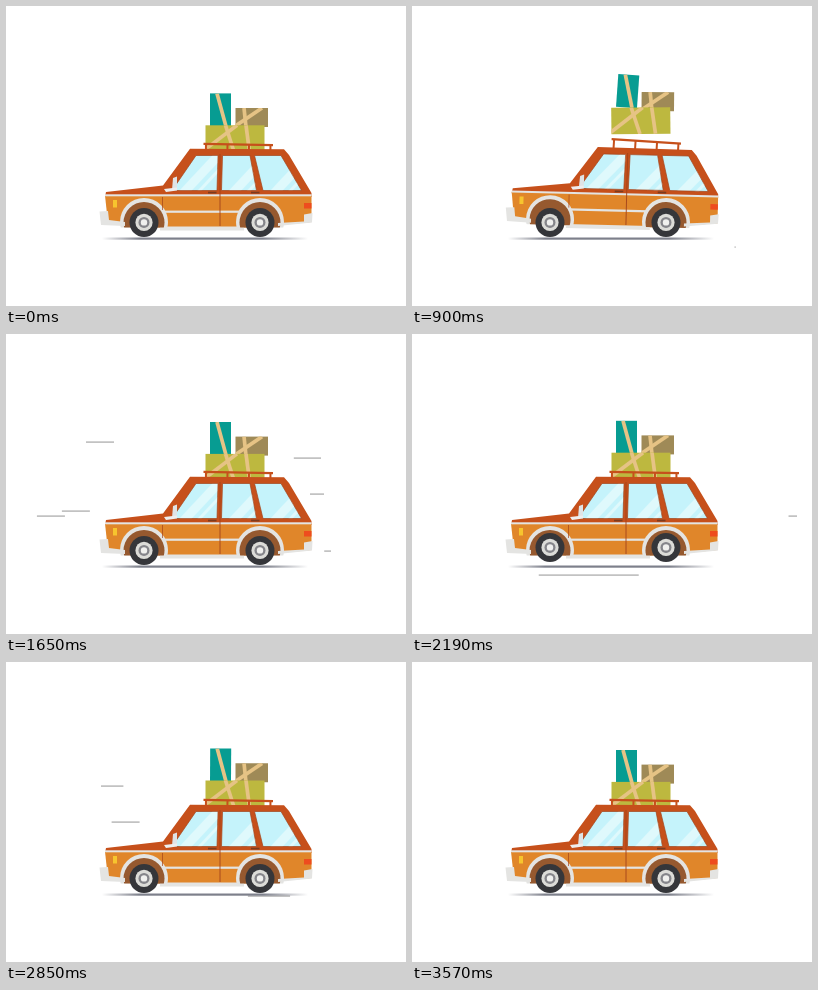
An HTML page with a canvas for the animation above (3.6 s loop, 400x300 px).

```html
<!DOCTYPE html>
<html lang="en">
<head>
<meta charset="utf-8">
<title>Road trip</title>
<style>
  html, body { margin: 0; width: 100%; height: 100%; overflow: hidden; background: #fff; }
  canvas { display: block; width: 400px; height: 300px; }
</style>
</head>
<body>
<canvas id="stage" width="400" height="300"></canvas>
<script>
const ctx = document.getElementById('stage').getContext('2d');
const LOOP = 3600, FRAME = 30;

const dark = '#c6501b', seam = '#a3441b', orange = '#e0862a', brown = '#96592f';
const pale = '#e4e4e2', glass = '#c5f3fb', tan = '#e6c385';

const clamp = (v, a, b) => Math.max(a, Math.min(b, v));

// Parabolic hop from start to start + dur, reaching 1 halfway
const hop = (t, start, dur) => Math.max(0, 1 - (2 * (t - start) / dur - 1) ** 2);

// A hop followed by a small rebound
const bounce = (t, start, dur) => hop(t, start, dur) + 0.15 * hop(t, start + dur, dur * 0.4);

function path(points) {
  ctx.beginPath();
  for (let i = 0; i < points.length; i += 2) ctx.lineTo(points[i], points[i + 1]);
}

function poly(color, ...points) {
  path(points);
  ctx.fillStyle = color;
  ctx.fill();
}

function line(color, width, ...points) {
  path(points);
  ctx.strokeStyle = color;
  ctx.lineWidth = width;
  ctx.stroke();
}

function rect(color, x, y, w, h) {
  ctx.fillStyle = color;
  ctx.fillRect(x, y, w, h);
}

function disc(color, x, y, r) {
  ctx.beginPath();
  ctx.arc(x, y, r, 0, Math.PI * 2);
  ctx.fillStyle = color;
  ctx.fill();
}

function turned(x, y, degrees, draw) {
  ctx.save();
  ctx.translate(x, y);
  ctx.rotate(degrees * Math.PI / 180);
  ctx.translate(-x, -y);
  draw();
  ctx.restore();
}

// Each lane has a height, a reach to both sides of the car and a first start.
const CENTER = 205, REPEAT = 1510, LAST_START = 3080, QUIET = 3270;
const lanes = [
  { y: 108, reach: 145, start: 65 },
  { y: 124, reach: 110, start: 1305 },
  { y: 160, reach: 113, start: 1275 },
  { y: 177, reach: 180, start: 48 },
  { y: 182, reach: 180, start: 87 },
  { y: 198, reach: 113, start: 685 },
  { y: 217, reach: 120, start: 1242 },
  { y: 234, reach: 156, start: 999 },
  { y: 241, reach: 118, start: 523 }
];

function drawStreaks(t) {
  if (t >= QUIET) return;
  for (const { y, reach, start } of lanes) {
    // Streaks get longer and faster close to the ground
    const ground = ((y - 108) / 133) ** 30;
    const length = 28 + 72 * ground, speed = 0.64 + 0.25 * ground;
    const from = CENTER - reach, to = CENTER + reach;
    for (let s = start; s < Math.min(t, LAST_START); s += REPEAT) {
      const head = from + speed * (t - s), tail = head - length;
      if (tail >= to) continue;
      const a = Math.max(tail, from);
      rect('#b4b4b4', a, y - 0.6, Math.max(1.2, Math.min(head, to) - a), 1.4);
    }
  }
}

function drawShadow() {
  const g = ctx.createLinearGradient(96, 0, 302, 0);
  const edge = 'rgba(120,122,134,0)', core = '#7d808b';
  [edge, core, core, edge].forEach((c, i) => g.addColorStop([0, 0.18, 0.78, 1][i], c));
  rect(g, 96, 231.5, 206, 2.2);
}

// A parcel with straps running from x1 on its top to x2 on its bottom
function parcel(color, x, y, w, h, dy, degrees, straps) {
  ctx.save();
  ctx.translate(0, dy);
  turned(x + w / 2, y + h, degrees, () => {
    rect(color, x, y, w, h);
    ctx.beginPath();
    ctx.rect(x, y, w, h);
    ctx.clip();
    for (const [x1, x2] of straps) line(tan, 3.7, x1, y, x2, y + h);
  });
  ctx.restore();
}

function drawLuggage(lift, shake) {
  const lean = Math.min(1, lift / 18);
  parcel('#079c92', 204, 87.4, 21, 33, shake - lift * 0.92, 4 * lean, [[211, 220]]);
  parcel('#9f8a57', 229.5, 102, 32.5, 19, shake - lift * 0.78, 0.5 * lean,
    [[238, 240], [256, 228]]);
  parcel('#bdb83f', 199.5, 119.3, 59, 26.5, shake - lift * 0.87, -0.7 * lean,
    [[219.5, 228], [240, 243.5], [231, 196]]);
}

function drawRack(lift) {
  turned(266, 139, 1 + 0.6 * lift, () => {
    rect(dark, 197.5, 138 - lift, 69.5, 2.3);
    for (let i = 0; i < 4; i++) rect(dark, 199 + 21.5 * i, 139 - lift, 2, 9);
  });
}

// Window between shared top and bottom edges, with slanted reflections
function pane(topLeft, topRight, bottomRight, bottomLeft) {
  const top = 149.5, bottom = 184.5;
  ctx.save();
  poly(glass, topLeft, top, topRight, top, bottomRight, bottom, bottomLeft, bottom);
  ctx.clip();
  for (const [shift, width] of [[8, 9], [22, 3]]) {
    const x = bottomLeft + shift;
    line('#dff9fc', width, x, bottom + 6, x + 44, top - 6);
  }
  ctx.restore();
  path([topLeft, top, topRight, top, bottomRight, bottom, bottomLeft, bottom]);
  ctx.closePath();
  ctx.strokeStyle = seam;
  ctx.lineWidth = 0.7;
  ctx.stroke();
}

function drawArch(x) {
  ctx.save();
  ctx.beginPath();
  ctx.rect(x - 30, 185, 60, 36.5);
  ctx.clip();
  disc(pale, x, 216, 24);
  disc(brown, x, 216.5, 20.5);
  ctx.restore();
}

function drawWheel(x, y) {
  disc('#35363a', x, y, 14.5);
  disc('#dcdcd8', x, y, 8.6);
  disc('#85858a', x, y, 5.5);
  disc('#f0f0ee', x, y, 3.2);
}

function drawBody() {
  // Cabin and hood
  poly(dark, 184, 142.7, 278, 143.3, 283, 149, 305.5, 187, 305.5, 191, 99, 191, 100, 186, 157, 179.5);
  pane(190, 212, 211, 166);
  pane(216.5, 244, 250.5, 215.5);
  pane(248.5, 275, 295.5, 257);

  // Side panels
  poly(orange, 99, 189.5, 305.5, 189.5, 305.5, 216, 272, 219, 236, 222, 156, 222, 102, 217);
  rect(pale, 99, 188.3, 206.5, 2);
  rect(pale, 156, 204.6, 81, 2.2);
  rect(pale, 154, 220.5, 84, 4);
  drawArch(138);
  drawArch(254);
  line(seam, 0.9, 214, 148, 214, 220);
  line(seam, 0.7, 156.5, 191, 156.5, 204);
  for (const x of [202, 245]) rect('#7b3c20', x, 185.7, 8.5, 1.7);

  // Mirror
  poly('#dfe3e5', 167, 172, 171, 170.5, 171, 183, 166, 184);
  poly('#eeeeee', 158, 183, 171, 181.5, 171, 184.5, 160, 186);

  // Lights and bumpers
  rect('#f7c52e', 107, 194, 4, 7.5);
  rect('#ee4c1e', 298, 197, 7.5, 5.5);
  poly(pale, 93.5, 205.5, 102, 205, 103, 214, 119, 216, 119, 220, 95, 219);
  poly(pale, 298, 208.5, 306.5, 207, 306, 216.5, 272, 220, 272, 217, 298, 215.5);
}

const jumps = [
  { start: 850, dur: 240, height: 31 },
  { start: 2545, dur: 296, height: 38 }
];

function render(t) {
  let lift = 6 * hop(t, 3335, 150), kick = 0, bump = 0;
  for (const { start, dur, height } of jumps) {
    lift += height * bounce(t, start, dur);
    kick += hop(t, start, 100);
    bump += hop(t, start - 440, 180);
  }
  const shake = -1.2 * Math.sin(t / 360 * Math.PI * 2);

  rect('#fff', 0, 0, 400, 300);
  drawStreaks(t);
  drawShadow();
  drawLuggage(lift, shake);
  // The nose rises around the rear axle as the luggage is thrown up
  turned(254, 216, 1.4 * kick, () => {
    drawRack(2 * kick);
    drawBody();
  });
  for (const x of [138, 254]) drawWheel(x, 216.4 - 3 * bump);
}

const origin = performance.now();
function tick() {
  const t = (performance.now() - origin) % LOOP;
  render(Math.floor(t / FRAME) * FRAME);
  requestAnimationFrame(tick);
}
tick();
</script>
</body>
</html>
```
